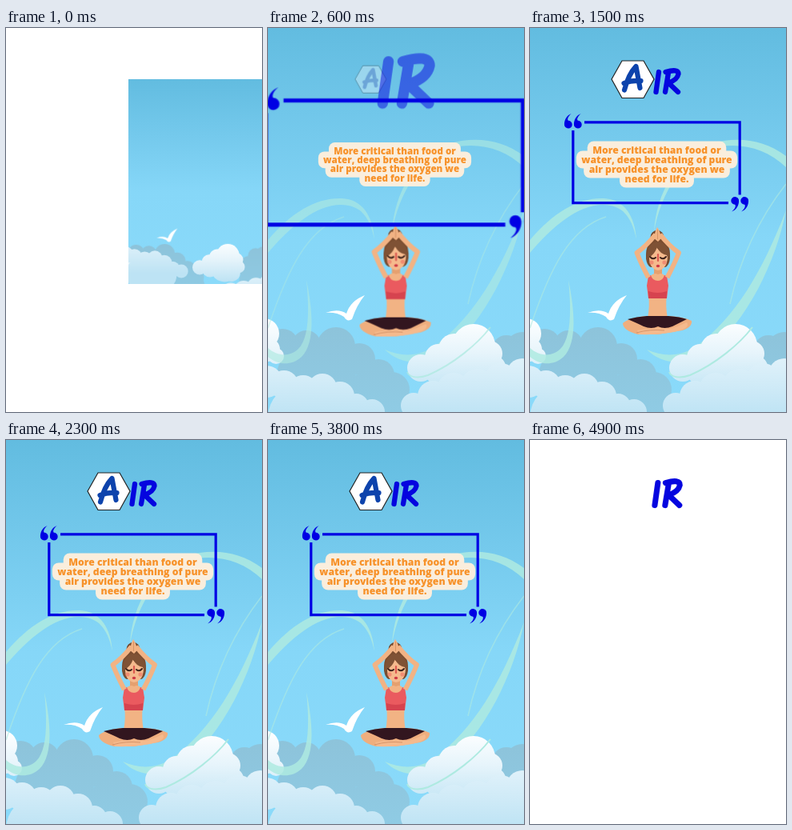
These frames come from a looping animation (320 px wide and 480 px high, 5000 ms). An HTML page:

```html
<!DOCTYPE html>
<html lang="en">
<head>
<meta charset="utf-8">
<title>Air</title>
<style>
html, body { margin: 0; width: 100%; height: 100%; overflow: hidden; background: #fff; }
svg { display: block; width: 100vw; height: 100vh; }
.anim { animation: 5s linear infinite; }

.scene { animation-name: scene; transform-origin: 0 0; }
.drift { animation-name: drift; }
.bird { transform-box: fill-box; transform-origin: center; }
.swirls { animation-name: swirls; }
.frame { animation-name: frame; transform-origin: 158px 168.3px; }
.quote { animation-name: quote; transform-origin: 158px 171px; }
.woman { animation-name: woman; transform-origin: 159px 316px; }
.hex { animation-name: hex; transform-origin: 128px 64px; }
.a { animation-name: a; transform-origin: 128px 64px; }
.ir { animation-name: ir; transform-origin: 170.5px 67px; }

.quote text {
  font: 800 12.2px "Open Sans", "Noto Sans", sans-serif;
  text-anchor: middle; fill: #f7922a;
}
.brush { fill: none; stroke-linecap: round; stroke-linejoin: round; }

@keyframes scene {
  0% { transform: translate(153px, 64px) scale(.5333); opacity: 1; animation-timing-function: ease-out; }
  6% { transform: translate(0, 0) scale(1); }
  90% { transform: translate(0, 0) scale(1); opacity: 1; }
  96%, 100% { transform: translate(0, 0) scale(1); opacity: 0; }
}
@keyframes drift {
  0% { transform: var(--in); animation-timing-function: ease-out; }
  12%, 78% { transform: translate(0, 0); animation-timing-function: ease-in; }
  88%, 100% { transform: var(--out); }
}
@keyframes swirls {
  0%, 2% { opacity: 0; }
  8% { opacity: .5; }
  16%, 80% { opacity: 1; }
  88% { opacity: .28; }
  92%, 100% { opacity: 0; }
}
@keyframes frame {
  0%, 4% { transform: scale(12); opacity: 0; filter: blur(.9px); }
  6% { transform: scale(7.8); opacity: .35; }
  8% { transform: scale(3.94); opacity: .62; filter: blur(.7px); }
  10% { transform: scale(2.26); opacity: 1; }
  12% { transform: scale(1.54); }
  14% { transform: scale(1.23); filter: blur(0); }
  16% { transform: scale(1.1); }
  18% { transform: scale(1.043); }
  22% { transform: scale(1); }
  84% { transform: scale(1); opacity: 1; }
  88% { opacity: .24; }
  92%, 100% { transform: scale(1); opacity: 0; filter: blur(0); }
}
@keyframes quote {
  0%, 4% { transform: scale(.5); opacity: 0; }
  8% { transform: scale(.85); opacity: 1; }
  14%, 86% { transform: scale(1); }
  88% { transform: scale(1.015); }
  90% { opacity: 1; }
  96%, 100% { transform: scale(1.2); opacity: 0; }
}
@keyframes woman {
  0%, 4% { transform: scale(1.6); opacity: 0; }
  8% { transform: scale(1.23); opacity: 1; animation-timing-function: ease-out; }
  14%, 88% { transform: scale(1); }
  90% { opacity: 1; }
  96%, 100% { transform: scale(1.16); opacity: 0; }
}
@keyframes hex {
  0%, 10% { transform: scale(.6); opacity: 0; }
  16% { transform: scale(1); opacity: 1; }
  90% { opacity: 1; }
  94%, 100% { transform: scale(1); opacity: 0; }
}
@keyframes a {
  0%, 10% { transform: scale(.6); opacity: 0; }
  16% { transform: scale(1); opacity: 1; }
  92% { opacity: 1; }
  98%, 100% { transform: scale(1); opacity: 0; }
}
@keyframes ir {
  0%, 10% { transform: scale(2.6); opacity: 0; }
  14% { transform: scale(1.6); opacity: 1; }
  16% { transform: scale(1.28); }
  18% { transform: scale(1.1); }
  22%, 96% { transform: scale(1); }
  98% { transform: scale(1.12); opacity: 1; }
  100% { transform: scale(1.25); opacity: 0; }
}
</style>
</head>
<body>
<svg viewBox="0 0 320 480" preserveAspectRatio="none">
  <defs>
    <linearGradient id="sky" x2="0" y2="1">
      <stop offset="0" stop-color="#62bce0"/>
      <stop offset=".27" stop-color="#74c9ec"/>
      <stop offset=".55" stop-color="#86d7f8"/>
      <stop offset="1" stop-color="#8adafa"/>
    </linearGradient>
    <linearGradient id="white" gradientUnits="userSpaceOnUse" x1="0" y1="368" x2="0" y2="465">
      <stop offset="0" stop-color="#fcfeff"/>
      <stop offset=".4" stop-color="#e6f4fb"/>
      <stop offset="1" stop-color="#b9e1f3"/>
    </linearGradient>
    <linearGradient id="pale" gradientUnits="userSpaceOnUse" x1="0" y1="415" x2="0" y2="485">
      <stop offset="0" stop-color="#dff1fa"/>
      <stop offset="1" stop-color="#bde3f4"/>
    </linearGradient>
    <linearGradient id="grey" gradientUnits="userSpaceOnUse" x1="0" y1="372" x2="0" y2="480">
      <stop offset="0" stop-color="#8dc3da"/>
      <stop offset="1" stop-color="#8fcbe4"/>
    </linearGradient>
    <clipPath id="stage"><path d="M0 0H320V480H0Z"/></clipPath>
    <g id="corner">
      <path d="M53.800 128V218.700H248" fill="none" stroke="#0000e4" stroke-width="3.2"/>
      <g fill="#0000e4">
        <path id="tick" transform="translate(256.200 216)" d="M-4 13.500C.5 10 1.500 6 0 4.800A4.900 4.900 0 1 1 4.900 0C5 6 1.500 11.500 -4 13.500Z"/>
        <use href="#tick" x="12"/>
      </g>
    </g>
    <path id="arm" d="M148 312Q139 295 133.500 281Q146 272 157 258" fill="none" stroke="#f2b384" stroke-width="6" stroke-linejoin="round"/>
  </defs>

  <g class="anim scene" clip-path="url(#stage)">
    <path fill="url(#sky)" d="M0 0H320V480H0Z"/>
    <g class="anim drift" fill="url(#grey)" style="--in:translate(0,12px);--out:translate(0,58px)" data-puffs="18 396 20,48 396 18,85 398 24,114 414 20,138 434 20,155 452 22,298 402 18,318 402 22,285 430 28,60 440 50,130 480 50,300 460 40"></g>
    <g class="anim drift" fill="url(#white)" style="--in:translate(-4px,30px);--out:translate(-10px,90px)" data-puffs="-5 382 19,0 402 15,10 410 10"></g>

    <g class="anim swirls" fill="#aeeae1">
      <g opacity=".85">
        <path d="M0 265C30 230 60 212 92 213C118 214 131 235 133 264C127 235 115 221 91 221C60 221 28 248 0 281Z"/>
        <path d="M48 315C57 358 58 395 42 411C28 424 10 420 0 411V400C12 411 28 411 38 401C51 388 52 355 48 315Z"/>
        <path d="M155 255C158 205 185 160 225 145C258 135 292 139 320 160V174C295 150 262 142 228 150C190 165 164 205 155 255Z"/>
        <path d="M320 228C308 290 272 368 220 407C194 424 164 420 146 402C168 412 190 410 208 398C258 360 290 305 320 228Z"/>
      </g>
      <g fill="none" stroke="#aeeae1" stroke-width="1.6" opacity=".6">
        <path d="M0 375C25 300 50 250 95 236"/>
        <path d="M320 195C285 240 262 290 250 345"/>
      </g>
    </g>

    <g class="anim drift" fill="url(#white)" style="--in:translate(-24px,16px);--out:translate(-9px,34px)" data-puffs="191 425 17,213 412 17,233 402 20,257 397 27,277 407 16,283 424 14,250 425 34,215 430 18,266 438 20"></g>
    <g class="anim drift" fill="url(#pale)" style="--in:translate(8px,46px);--out:translate(0,28px)" data-puffs="182 472 16,206 460 19,232 452 21,262 448 22,291 440 21,318 433 20,300 470 34,250 478 34,210 484 24"></g>
    <path class="anim swirls" d="M278 374C262 395 232 420 200 434C186 439 176 436 174 430" fill="none" stroke="#aeeae1" stroke-width="2" opacity=".8"/>
    <g class="anim drift" fill="url(#pale)" style="--in:translate(-6px,-30px);--out:translate(-10px,56px)" data-puffs="-2 442 20,20 446 18,44 452 18,68 450 18,90 460 18,110 473 16,130 480 16,40 486 40,85 490 34"></g>
    <g class="anim drift bird" style="--in:translate(-6px,16px);--out:translate(-36px,32px) scale(1.2)">
      <path fill="#fff" d="M72 356Q88 350 98 357Q103 341 121 334Q111 346 105 364Q99 368 95 361Q86 355 72 356Z"/>
    </g>
  </g>

  <g class="anim woman">
    <circle cx="159" cy="261.500" r="8.500" fill="#6f452b"/>
    <path d="M145 288Q144 264 160 264Q176 264 175 288Q174 297 169 299H151Q146 297 145 288Z" fill="#7a4d30"/>
    <path d="M155 298H165V310H155Z" fill="#e5a06f"/>
    <path d="M148 334H171Q169 347 172 363H147Q150 347 148 334Z" fill="#f2b384"/>
    <path d="M147 315Q153 304 160 308Q167 304 172 315L171 338H148Z" fill="#f2b384"/>
    <path d="M148 310L151 309Q153 316 160 316Q166 316 168 309L171 310L173 322L171 338H148L146 322Z" fill="#ea5a5f"/>
    <path d="M148 329Q160 333 171 329V338H148Z" fill="#d6434f"/>
    <use href="#arm"/>
    <use href="#arm" transform="matrix(-1 0 0 1 319.5 0)"/>
    <path d="M155 263Q156 254 159 249Q163 254 164 263L160 267Z" fill="#f2b384"/>
    <path d="M159.500 252V264" stroke="#cf8d60" stroke-width=".8"/>
    <path d="M149 283Q154 280 157 273Q163 281 172 282Q173 301 160 303Q148 301 149 283Z" fill="#f5ba8d"/>
    <path d="M145 289Q148 267 160 267Q173 268 175 289Q172 288 171 284Q162 282 159 274Q155 284 149 286Q148 290 145 289Z" fill="#7f5235"/>
    <path d="M150 286Q153.500 290 157 287M163 287Q166.500 290 170 286" fill="none" stroke="#3e231b" stroke-width="2" stroke-linecap="round"/>
    <path d="M160 283V291" stroke="#dc5a51" stroke-width="2.200" stroke-linecap="round"/>
    <ellipse cx="160" cy="297.500" rx="2.200" ry="1.700" fill="#cf3845"/>
    <g fill="#f08d72">
      <circle cx="152" cy="293" r="2.600"/>
      <circle cx="168" cy="293" r="2.600"/>
    </g>
    <path d="M146 360H173Q192 361 202 366Q203 374 190 378L160 383H135Q116 378 116 369Q124 362 146 360Z" fill="#efae7e"/>
    <path d="M146 360H173Q188 361 196 364Q186 369 178 373Q168 377 160 373Q152 377 142 373Q134 369 122 364Q133 361 146 360Z" fill="#32161f"/>
    <path d="M134 378Q157 374 175 376Q186 373 196 368Q200 374 188 378Q168 384 136 383Z" fill="#f5ba8d"/>
    <path d="M133 381Q150 376 168 378" fill="none" stroke="#cf8a60" stroke-width=".8"/>
  </g>

  <g class="anim frame">
    <use href="#corner"/>
    <use href="#corner" transform="rotate(180 158 168.3)"/>
  </g>

  <g class="anim quote">
    <g id="plates" fill="#faeedd"></g>
    <text id="words"></text>
  </g>

  <g role="img" aria-label="AIR">
    <path class="anim hex" d="M102 64L115 41H142L155 64L142 87.500H115Z" fill="#fff" stroke="#222" stroke-width="1.200"/>
    <g class="anim a">
      <path class="brush" d="M118 77.500Q123 58 132.500 48L137.500 75M117.500 69Q127 65 138.500 66" stroke="#0d43ac" stroke-width="6.200"/>
    </g>
    <g class="anim ir">
      <path class="brush" d="M161 55L157.500 80M173 56L169 80M169.500 55Q185.500 50.500 185.500 57.500Q184 65 173 68.500L185 80" stroke="#0505df" stroke-width="6.300"/>
    </g>
  </g>
</svg>
<script>
const NS = "http://www.w3.org/2000/svg";
const LOOP = 5000, STEP = 100;
const MID = 158.5, PAD = 6.5;

function add(parent, name, attrs) {
  const el = parent.appendChild(document.createElementNS(NS, name));
  for (const key in attrs) el.setAttribute(key, attrs[key]);
  return el;
}

for (const cloud of document.querySelectorAll("[data-puffs]")) {
  for (const puff of cloud.dataset.puffs.split(",")) {
    const [cx, cy, r] = puff.split(" ");
    add(cloud, "circle", { cx, cy, r });
  }
}

// Each line of the quote sits on its own rounded plate.
const words = document.getElementById("words");
const plates = document.getElementById("plates");
[
  "More critical than food or",
  "water, deep breathing of pure",
  "air provides the oxygen we",
  "need for life."
].forEach((line, i) => {
  const y = 157 + i * 12;
  const span = add(words, "tspan", { x: MID, y });
  span.textContent = line;
  const width = span.getComputedTextLength() + 2 * PAD;
  add(plates, "rect", { x: MID - width / 2, y: y - 15.5, width, height: 22, rx: 8 });
});

// The keyframes advance in steps of a tenth of a second.
const anims = document.getAnimations();
anims.forEach(anim => anim.pause());
const start = performance.now();

function tick() {
  const time = (performance.now() - start) % LOOP;
  const now = Math.floor(time / STEP) * STEP;
  for (const anim of anims) anim.currentTime = now;
  requestAnimationFrame(tick);
}
tick();
</script>
</body>
</html>
```
